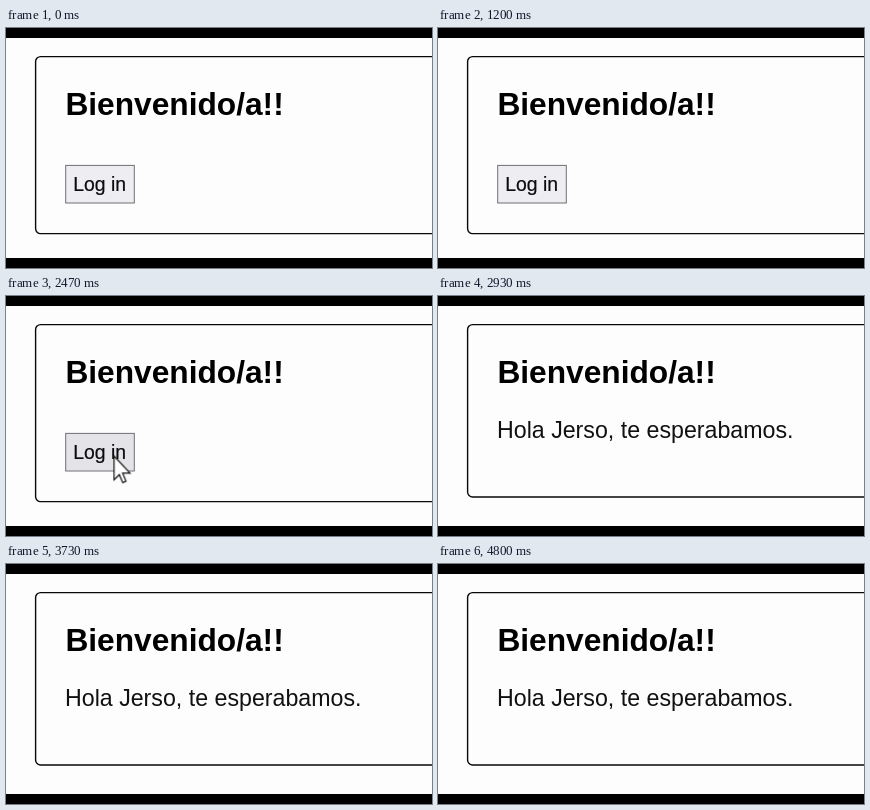
An HTML page that plays this animation: 426x240 px, repeating every 4870 ms.

```html
<!DOCTYPE html>
<html lang="es">
<head>
<meta charset="utf-8">
<title>Bienvenido/a</title>
<style>
  html, body { margin: 0; width: 100%; height: 100%; overflow: hidden; background: #000; }
  svg { display: block; width: 100vw; height: 100vh; font-family: "Liberation Sans", Arial, sans-serif; }
  .card { fill: #fdfdfe; stroke: #080808; stroke-width: 1.4; }
  .login, .welcome, .button, .cursor { animation: 4870ms -6ms infinite; }
  .login, .welcome, .button { animation-timing-function: step-end; }
  .login { animation-name: login; }
  .welcome { animation-name: welcome; }
  .button { fill: #eeeef2; stroke: #707074; animation-name: hover; }
  .cursor { fill: #fff; stroke: #111; stroke-width: .9; animation-name: move; }

  @keyframes login { 0% { visibility: visible } 52.05%, 100% { visibility: hidden } }
  @keyframes welcome { 0% { visibility: hidden } 52.05%, 100% { visibility: visible } }
  @keyframes hover { 0% { fill: #eeeef2 } 45.21%, 100% { fill: #e4e4e8 } }
  /* pointer enters from below, clicks the button and leaves; 73 ticks per loop */
  @keyframes move {
    0% { transform: translate(172px, 232px); animation-timing-function: step-end }
    34.25% { transform: translate(172px, 232px); animation-timing-function: steps(4) }
    39.73% { transform: translate(143.7px, 192px); animation-timing-function: steps(5) }
    46.58% { transform: translate(108px, 160px); animation-timing-function: step-end }
    52.05% { transform: translate(108px, 160px); animation-timing-function: steps(4) }
    57.53%, 100% { transform: translate(150px, 232px) }
  }
</style>
</head>
<body>
<svg viewBox="0 0 426 240" preserveAspectRatio="none">
  <rect y="10" width="426" height="220" fill="#fdfdfe"/>
  <g class="login">
    <rect class="card" x="29.6" y="28.6" width="420" height="177" rx="5"/>
    <rect class="button" x="59.7" y="137.4" width="68.6" height="37.6"/>
    <text x="67.3" y="162.8" font-size="19.4" fill="#0c0c10" stroke="#0c0c10" stroke-width=".2">Log in</text>
  </g>
  <g class="welcome">
    <rect class="card" x="29.6" y="28.6" width="420" height="172.4" rx="5"/>
    <text x="59" y="142" font-size="23.2" fill="#111">Hola Jerso, te esperabamos.</text>
  </g>
  <text x="59.4" y="87.3" font-size="31.7" font-weight="700">Bienvenido/a!!</text>
  <g class="cursor">
    <path transform="scale(1.33 1.4)" d="M0 0V17L4 13.3L6.6 19L9 18L6.5 12.2H12Z"/>
  </g>
  <path d="M0 0H426V10H0ZM0 230H426V240H0Z"/>
</svg>
</body>
</html>
```
